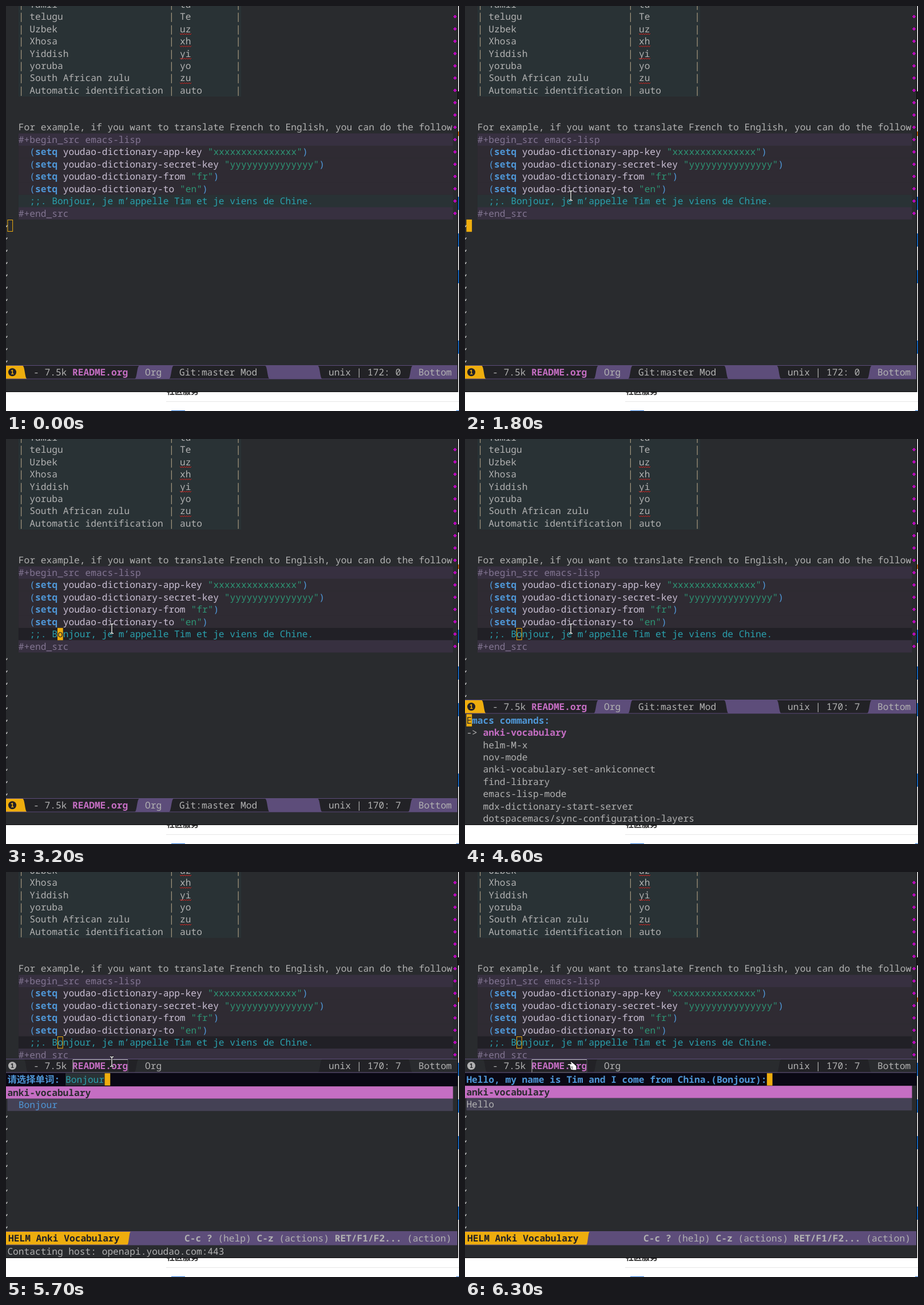
An HTML page that plays this animation: 792x707 px, repeating every 8 s.

```html
<!DOCTYPE html>
<html lang="en">
<head>
<meta charset="utf-8">
<title>Editor vocabulary lookup</title>
<style>
  html, body { margin: 0; width: 100%; height: 100%; overflow: hidden; background: #fff; }
  svg { display: block; width: 792px; height: 707px; }
  text {
    font: 16.22px "Noto Sans Mono", monospace;
    white-space: pre;
    text-rendering: geometricPrecision;
    font-variant-ligatures: none;
  }
  .b { font-weight: 700; }
  .cjk { font-family: "Noto Sans CJK SC", "Noto Sans CJK", sans-serif; font-weight: 700; }
</style>
</head>
<body>
<svg id="stage" viewBox="0 0 792 707"></svg>
<script>
const LOOP = 8000;
const CELL = 9.73, LINE = 21.47, LEFT = 2.4, TOP = 18.5;
const C = {
  bg: '#292b2e', dark: '#222226', hl: '#212026', text: '#b2b2b2', gold: '#eead0e',
  violet: '#5d4d7a', pink: '#c56ec3', blue: '#4f97d7', green: '#2d9574', teal: '#2aa1ae',
  lilac: '#cbc1d5', meta: '#827591', head: '#373040', block: '#2f2b33', table: '#293235',
  bar: '#a89a80', prompt: '#0a0814', pick: '#444155'
};

const colX = c => LEFT + c * CELL;
const rowY = r => TOP + r * LINE;
const rect = (x, y, w, h, fill, more = '') =>
  `<rect x="${x}" y="${y}" width="${w}" height="${h}" fill="${fill}" ${more}/>`;
const path = (d, stroke, more = '') => `<path d="${d}" fill="none" stroke="${stroke}" ${more}/>`;
const text = (x, y, s, fill = C.text, cls = '', more = '') =>
  `<text x="${x}" y="${y + 5.6}" fill="${fill}" class="${cls}" ${more}>${s}</text>`;
const band = (x, y, w, fill) => rect(x, y - LINE / 2, w, LINE, fill);

function cursor(x, y, solid, ch = '') {
  if (!solid) return rect(x + .5, y - 10, CELL - 1, LINE - 1.5, 'none', `stroke="${C.gold}"`);
  return band(x, y, CELL, C.gold) + text(x, y, ch, C.bg);
}

// Coloured runs of one line, given as [text, colour, class].
function runs(row, col, list) {
  let out = '';
  for (const [s, fill, cls] of list) {
    out += text(colX(col), rowY(row), s, fill, cls);
    col += s.length;
  }
  return out;
}

function wavy(col, row) {
  let d = `M${colX(col)} ${rowY(row) + 8}`;
  for (let i = 0; i < 10; i++) d += `l2 ${i % 2 ? -2 : 2}`;
  return path(d, '#e0211d');
}

function languages() {
  const list = [['Tamil', 'ta'], ['telugu', 'Te'], ['Uzbek', 'uz', 1], ['Xhosa', 'xh', 1],
    ['Yiddish', 'yi', 1], ['yoruba', 'yo'], ['South African zulu', 'zu', 1],
    ['Automatic identification', 'auto']];
  let out = rect(colX(2), -30, 40 * CELL, rowY(6) + LINE / 2 + 30, C.table);
  list.forEach(([name, code, odd], i) => {
    const r = i - 1, y = rowY(r);
    for (const c of [2, 29, 41]) out += text(colX(c), y, '|', C.bar);
    out += text(colX(4), y, name) + text(colX(31), y, code);
    if (odd) out += wavy(31, r);
  });
  return out;
}

function setq(row, name, value) {
  return runs(row, 4, [['(', C.blue], ['setq', C.blue, 'b'], [` youdao-dictionary-${name} `, C.lilac],
    [`"${value}"`, C.green], [')', C.blue]]);
}

function buffer(cur, scroll = 0) {
  const [row, col, solid, ch] = cur, x = colX(2), w = 781.5 - x;
  let out = languages();
  out += text(x, rowY(9), 'For example, if you want to translate French to English, you can do the follow');
  for (let r = 10; r <= 16; r++) {
    const fill = r === row ? C.hl : r === 10 || r === 16 ? C.head : r === 15 ? C.table : C.block;
    out += band(x, rowY(r), w, fill);
  }
  out += text(x, rowY(10), '#+begin_src emacs-lisp', C.meta);
  out += setq(11, 'app-key', 'x'.repeat(15)) + setq(12, 'secret-key', 'y'.repeat(15));
  out += setq(13, 'from', 'fr') + setq(14, 'to', 'en');
  out += text(colX(4), rowY(15), ';;. Bonjour, je m’appelle Tim et je viens de Chine.', C.teal);
  out += text(x, rowY(16), '#+end_src', C.meta);
  for (let r = 0; r <= 16; r++) out += `<path d="M785 ${rowY(r) - 3}l3 3l-3 3l-3 -3z" fill="#e000e0"/>` +
    rect(784.4, rowY(r) - .6, 1.2, 1.2, C.bg);
  out += cursor(colX(col), rowY(row), solid, ch);
  return `<g transform="translate(0 ${-scroll * LINE})">${out}</g>`;
}

function tildes(from = 17) {
  let out = '';
  for (let r = from; r <= 28; r++) out += path(`M0 ${rowY(r) + 2}q1.6 0 2 -3`, '#d8d8d8', 'stroke-width="1.2"');
  return out;
}

// Mode-line segment between two S-shaped edges; a lean shifts the foot sideways.
function seg(y, x1, d1, x2, d2, fill) {
  const a = y + 1, b = y + 24;
  return `<path fill="${fill}" d="M${x1 - d1} ${a}C${x1} ${a} ${x1} ${b} ${x1 + d1} ${b}` +
    `L${x2 + d2} ${b}C${x2} ${b} ${x2} ${a} ${x2 - d2} ${a}Z"/>`;
}

const frameLines = y => path(`M0 ${y + .5}H789M0 ${y + 24}H789`, C.violet);

function modeline(y, pos, active = true) {
  const m = y + 12.3;
  let out = rect(0, y, 789, 25, active ? C.dark : C.bg);
  if (active) {
    out += seg(y, -9, 0, 33, 4, C.gold) + seg(y, 229, -4, 289, -4, C.violet) +
      seg(y, 457, 4, 549, 4, C.violet) + seg(y, 707, -4, 789, 0, C.violet);
  } else {
    out += seg(y, 35, 4, 228, -4, C.dark) + seg(y, 549, -4, 707, 4, C.dark);
  }
  out += frameLines(y);
  out += `<circle cx="11" cy="${m}" r="7" fill="${active ? C.hl : C.text}"/>` +
    text(11, m - 1.6, '1', active ? C.gold : C.bg, 'b', 'text-anchor="middle" style="font-size:11px"');
  out += text(48, m, '- 7.5k') + text(116, m, 'README.org', C.pink, 'b') + text(243, m, 'Org');
  if (active) out += text(303, m, 'Git:master Mod');
  else out += path(`M117 ${y + 24}V${y + 1.5}H213`, '#b8b8b8') + path(`M117 ${y + 23.5}H213V${y + 2}`, '#55555a');
  return out + text(564, m, 'unix | ' + pos) + text(721, m, 'Bottom');
}

const echo = s => text(LEFT, 662.5, s);
const HOST = 'Contacting host: openapi.youdao.com:443';

const editing = (cur, pos, msg = '') => buffer(cur) + tildes() + modeline(627, pos) + echo(msg);

const HOLLOW = [15, 9, false];

function commands(col, ch) {
  const items = ['anki-vocabulary', 'helm-M-x', 'nov-mode', 'anki-vocabulary-set-ankiconnect', 'find-library',
    'emacs-lisp-mode', 'mdx-dictionary-start-server', 'dotspacemacs/sync-configuration-layers'];
  const y = i => 491 + i * 21.45;
  let out = buffer(HOLLOW) + tildes() + rect(0, 455, 789, 218, C.bg) + modeline(455, '170: 7');
  out += text(LEFT, y(0), 'Emacs commands:', C.blue, 'b') + cursor(colX(col), y(0), true, ch);
  out += text(LEFT, y(1), '-&gt;');
  items.forEach((s, i) => out += text(colX(3), y(i + 1), s, i ? C.text : C.pink, i ? '' : 'b'));
  return out;
}

function helm(prompt, shift, choice, col, fill, msg = '') {
  const y = 384 + shift, m = 639.3;
  let out = buffer(HOLLOW, 2) + rect(0, 326, 789, 347, C.bg) + modeline(326, '170: 7', false);
  out += rect(0, 351, 789, 22 + shift, C.prompt) + prompt;
  out += band(0, y, 781.5, C.pink) + text(LEFT, y, 'anki-vocabulary', C.bg, 'b');
  out += band(LEFT, y + LINE, 779, C.pick) + text(colX(col), y + LINE, choice, fill);
  out += tildes(19) + rect(0, 627, 789, 24, C.violet) + seg(627, -9, 0, 215, -3, C.gold) + frameLines(627);
  out += text(4, m, 'HELM Anki Vocabulary', C.hl, 'b');
  let x = 312;
  for (const [key, act] of [['C-c ?', '(help)'], ['C-z', '(actions)'], ['RET/F1/F2...', '(action)']]) {
    out += text(x, m, key, C.text, 'b');
    x += (key.length + 1) * CELL;
    out += text(x, m, act);
    x += (act.length + 1) * CELL;
  }
  return out + echo(msg);
}

const WORD = text(LEFT, 362, '请选择单词', C.blue, 'cjk', 'style="font-size:16.4px"') +
  text(84.5, 362, ':', C.blue, 'b') + band(104, 362, 7 * CELL, C.table) +
  text(104, 362, 'Bonjour', C.teal) + cursor(172.5, 362, true);
const PHRASE = text(LEFT, 362, 'Hello, my name is Tim and I come from China.(Bonjour):', C.blue, 'b') +
  cursor(colX(54), 362, true);

const scenes = [
  [0, editing([17, 0, false], '172: 0')],
  [1200, editing([17, 0, true], '172: 0')],
  [2200, editing([16, 2, true, '#'], '171: 0')],
  [2400, editing([15, 2, true], '170: 0')],
  [2900, editing([15, 8, true, 'B'], '170: 6')],
  [3200, editing([15, 9, true, 'o'], '170: 7')],
  [3900, commands(16)],
  [4600, commands(0, 'E')],
  [4700, helm(WORD, 1, 'Bonjour', 2, C.blue)],
  [5700, helm(WORD, 1, 'Bonjour', 2, C.blue, HOST)],
  [6000, editing([15, 9, true, 'o'], '170: 7', HOST)],
  [6300, helm(PHRASE, 0, 'Hello', 0, C.text)]
];

const page = rect(0, 0, 792, 707, '#fff') +
  text(281, 672, '社区服务', '#222', 'cjk', 'style="font-size:14px"') +
  rect(280, 690, 512, 1, '#e6e6e6') + rect(289, 706, 24, 1, '#2f7de1') + rect(787, 706, 5, 1, '#2f7de1') +
  [333, 397, 461, 584].map(y => rect(790, y, 2, 23, '#1a7de8')).join('') +
  rect(790, 149, 2, 14, '#222') + rect(790, 219, 2, 8, '#e07b1a');

const beamPath = 'M-3 -8.5Q0 -8.5 0 -6.5Q0 -8.5 3 -8.5M0 -6.5V6.5M-3 8.5Q0 8.5 0 6.5Q0 8.5 3 8.5';
const beam = path(beamPath, '#111', 'stroke-width="3"') + path(beamPath, '#fff', 'stroke-width="1.3"');
const hand = '<path d="M-6 1.5Q-8 0 -6 -1H0L-2 -4Q-1 -6 1 -4L6 0L9 3V10H3L-1 9Q-3 8 -1 7Q-4 6 -2 4.5Q-4 3 -2 2Z" ' +
  'fill="#fff" stroke="#111"/>' + path('M-1 4.5H3M0 7H3', '#111', 'stroke-width=".8"');

const stage = document.getElementById('stage');
stage.innerHTML = page + rect(0, 0, 790.5, 674, '#0b0b0d') + rect(0, 0, 789, 673, C.bg) +
  scenes.map(s => `<g class="scene" display="none">${s[1]}</g>`).join('') +
  `<g id="beam">${beam}</g><g id="hand" transform="translate(186 336)">${hand}</g>`;

const groups = stage.querySelectorAll('.scene');
const beamEl = document.getElementById('beam'), handEl = document.getElementById('hand');
const show = (el, on) => el.setAttribute('display', on ? 'inline' : 'none');
let shown = -1;

function draw(t) {
  let i = scenes.length - 1;
  while (scenes[i][0] > t) i--;
  if (i !== shown) {
    groups.forEach((g, k) => show(g, k === i));
    shown = i;
  }
  // The pointer glides in from the right in 100 ms steps.
  const p = Math.min(1, Math.max(0, Math.floor((t - 1100) / 100) / 7));
  const left = (1 - p) ** 2;
  beamEl.setAttribute('transform', `translate(${185 + 605 * left} ${331 + 40 * left})`);
  const overLink = (t >= 4700 && t < 5700) || t >= 6300;
  show(handEl, overLink);
  show(beamEl, t >= 1200 && !overLink);
}

const start = performance.now();
function tick() {
  draw((performance.now() - start) % LOOP);
  requestAnimationFrame(tick);
}
tick();
</script>
</body>
</html>
```
